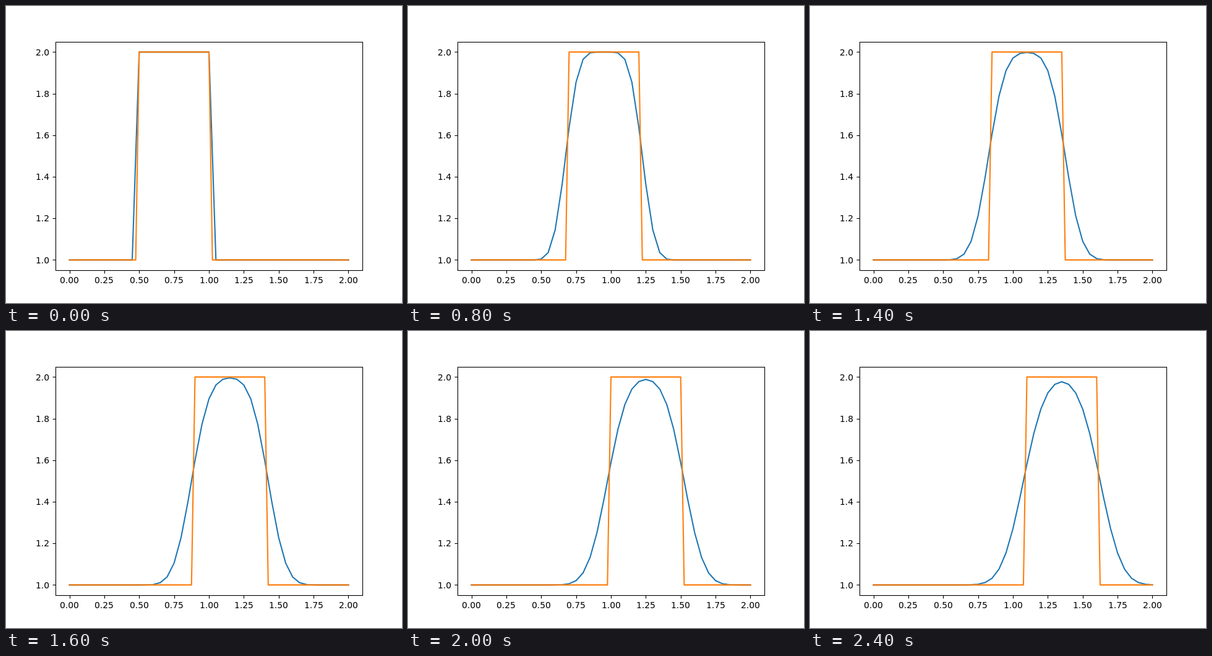
These frames come from a looping animation (640 px wide and 480 px high, 2.5 s). An HTML page with a canvas:

```html
<!DOCTYPE html>
<html lang="en">
<head>
<meta charset="utf-8">
<title>Square wave advection</title>
<style>
html, body { margin: 0; width: 100%; height: 100%; overflow: hidden; background: #fff; }
canvas { display: block; }
</style>
</head>
<body>
<canvas id="plot" width="640" height="480"></canvas>
<script>
const ctx = document.getElementById('plot').getContext('2d');
const STEP_MS = 100, STEPS = 25;
const px = x => 80 + 496 / 22 + x * 496 / 2.2;
const py = y => 410.4 - (y - 1) * 336;
const crisp = v => Math.round(v) + 0.5;

// Upwind advection on n points over [0, 2], one time step of 0.025 s
function solve(n, steps) {
  const dx = 2 / (n - 1), courant = 0.025 / dx;
  let u = Array.from({ length: n }, (_, i) => i * dx > 0.499 && i * dx < 1.001 ? 2 : 1);
  while (steps-- > 0) u = u.map((v, i) => i ? v - courant * (v - u[i - 1]) : v);
  return u;
}

function curve(u, color) {
  ctx.beginPath();
  u.forEach((v, i) => ctx.lineTo(px(2 * i / (u.length - 1)), py(v)));
  ctx.strokeStyle = color;
  ctx.lineWidth = 1.5 * 100 / 72;
  ctx.lineCap = 'square';
  ctx.lineJoin = 'round';
  ctx.stroke();
}

function tick(x, y, dx, dy) {
  ctx.beginPath();
  ctx.moveTo(x, y);
  ctx.lineTo(x + dx, y + dy);
  ctx.stroke();
}

function axes() {
  ctx.strokeStyle = ctx.fillStyle = '#000';
  ctx.lineWidth = 0.8 * 100 / 72;
  ctx.lineCap = 'butt';
  ctx.lineJoin = 'miter';
  ctx.font = `${1000 / 72}px "DejaVu Sans", sans-serif`;
  ctx.strokeRect(80.5, 58.5, 496, 369);
  for (let i = 0; i <= 8; i++) {
    const label = (i / 4).toFixed(2), x = px(i / 4);
    tick(crisp(x), 427.5, 0, 5);
    ctx.fillText(label, Math.round(x - ctx.measureText(label).width / 2), 448);
  }
  for (let i = 0; i <= 5; i++) {
    const value = 1 + i / 5, label = value.toFixed(1), y = py(value);
    tick(80.5, crisp(y), -5, 0);
    ctx.fillText(label, Math.round(70.28 - ctx.measureText(label).width), Math.round(y + 5.28));
  }
}

function draw() {
  const step = Math.floor(performance.now() / STEP_MS) % STEPS;
  ctx.fillStyle = '#fff';
  ctx.fillRect(0, 0, 640, 480);
  curve(solve(41, step), '#1f77b4');
  curve(solve(81, step), '#ff7f0e');
  axes();
  requestAnimationFrame(draw);
}
draw();
</script>
</body>
</html>
```
